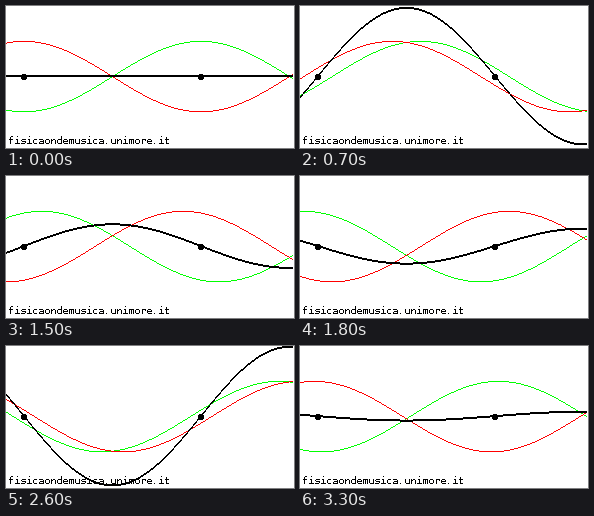
A matplotlib script that plays this animation: 288x142 px, repeating every 3400 ms.

```python
import numpy as np
import matplotlib.pyplot as plt
from matplotlib.animation import FuncAnimation
from matplotlib.patches import Circle

W, H, DPI = 288, 142, 64
FRAMES, INTERVAL = 34, 100
CYCLES_PER_FRAME = 0.03
MID, AMP = 70.1, 35.25
NODE, WAVELENGTH = 17.5, 354

plt.rcParams.update({
    "text.antialiased": False,
    "text.hinting": "default",
    "text.hinting_factor": 1,
    "toolbar": "None",
})

fig = plt.figure(figsize=(W / DPI, H / DPI), dpi=DPI, facecolor="white")
ax = fig.add_axes([0, 0, 1, 1])

x = np.arange(W - 1)
edges = np.arange(W)
angle = 2 * np.pi * (x - NODE) / WAVELENGTH


def curve(color, z):
    """A band of whole pixels, one step per column."""
    return ax.stairs(np.ones(W - 1), edges, baseline=np.zeros(W - 1),
                     fill=True, facecolor=color, edgecolor="none",
                     linewidth=0, antialiased=False, zorder=z)


def place(band, y, width):
    row = np.round(y)
    band.set_data(row + 1, edges, row + 1 - width)


backward = curve("#00ff00", 1)
forward = curve("#ff0000", 2)
total = curve("black", 3)

for node in (NODE, NODE + WAVELENGTH / 2):
    ax.add_patch(Circle((node + 0.5, 71), 2.8, fc="black", lw=0,
                        antialiased=False, zorder=4))

ax.text(2, 138, "fisicaondemusica.unimore.it", family="DejaVu Sans Mono",
        size=10 * 72 / DPI, color="black", va="baseline", zorder=5)
ax.set(xlim=(0, W), ylim=(H, 0))
ax.axis("off")


def update(i):
    phase = 2 * np.pi * CYCLES_PER_FRAME * i
    place(forward, MID - AMP * np.cos(angle - phase), 1)
    place(backward, MID + AMP * np.cos(angle + phase), 1)
    # The two travelling waves add up to a standing one.
    place(total, MID - 2 * AMP * np.sin(angle) * np.sin(phase), 2)
    return backward, forward, total


anim = FuncAnimation(fig, update, frames=FRAMES, interval=INTERVAL,
                     init_func=lambda: update(0), repeat=True,
                     repeat_delay=0, blit=False)
plt.show()
```
